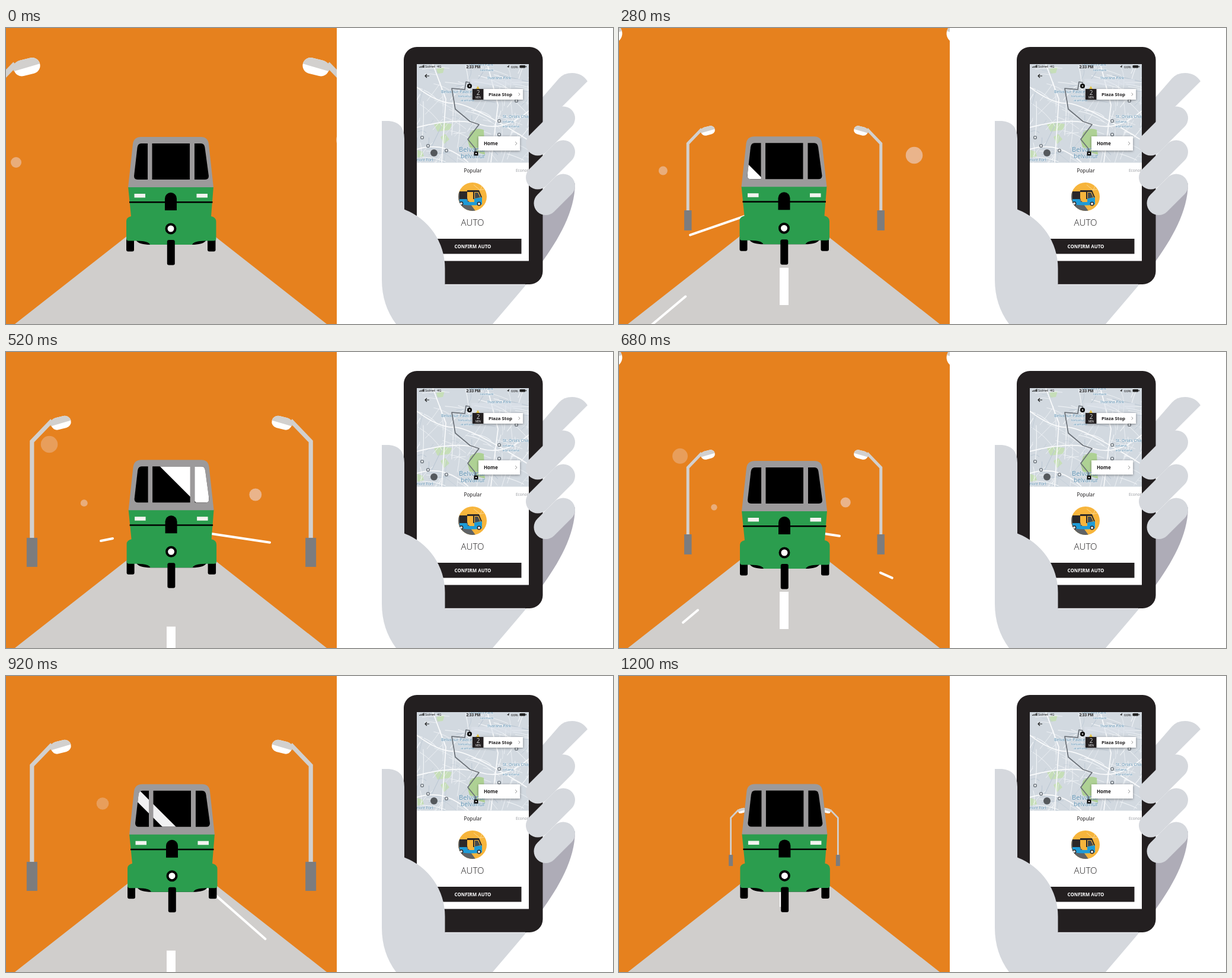
Recreate the animation shown at these times as an HTML page. Size 1024 by 500 pixels, loop 1240 ms.

```html
<!DOCTYPE html>
<html lang="en">
<head>
<meta charset="utf-8">
<title>Auto ride</title>
<style>
html, body { margin: 0; width: 100%; height: 100%; overflow: hidden; background: #fff; }
svg { display: block; width: 1024px; height: 500px; }
text { font-family: "Noto Sans", "Open Sans", sans-serif; fill: #1c1a1b; }
.place { fill: #5d8eae; stroke: #eef3f7; stroke-width: 1; paint-order: stroke; }
.bold { font-weight: 700; }
.mid { text-anchor: middle; }
.card { fill: #fff; filter: drop-shadow(0 1px 2px #0006); }
</style>
</head>
<body>
<svg viewBox="0 0 1024 500" xmlns="http://www.w3.org/2000/svg">
  <defs>
    <clipPath id="stage"><rect width="558" height="500"/></clipPath>
    <clipPath id="mapBox"><rect x="693" y="61" width="189" height="166.500"/></clipPath>
    <clipPath id="screenBox"><rect x="693" y="61" width="189" height="332.500"/></clipPath>
    <clipPath id="badge"><circle cx="787" cy="285" r="24"/></clipPath>
    <path id="glass" d="M216 250L221.500 202Q222.500 195 228 195H329Q334.500 195 335.500 202L342 250Q342 256 336 256H222Q216 256 216 250Z"/>
    <clipPath id="pane"><use href="#glass"/></clipPath>
    <g id="lamp">
      <path d="M-163 40V-99.500L-139.500 -124" fill="none" stroke="#d2d0ce" stroke-width="5"/>
      <rect x="-169.200" y="13.300" width="12.500" height="34" fill="#7c7c7e"/>
      <g transform="translate(-129.100 -121.300) rotate(-14)">
        <rect x="-11.900" y="-7.150" width="23.800" height="14.300" rx="7.150" fill="#fff"/>
        <path d="M-12.500 1L-12 -4Q-9 -7.150 -4.750 -7.150H4.750A7.150 7.150 0 0 1 11.900 0Z" fill="#d2d0ce"/>
      </g>
    </g>
  </defs>

  <g clip-path="url(#stage)">
    <rect width="558" height="500" fill="#e6811e"/>
    <path d="M15 500L215 343H341L541 500Z" fill="#d0cecc"/>
    <g id="dashes" fill="#fff"></g>
    <g id="lamps"></g>
    <g id="bubbles" fill="#ecdfe6"></g>
    <g id="streaks" stroke="#fff" stroke-width="4" stroke-linecap="round"></g>
    <g id="auto">
      <rect x="203" y="352" width="13" height="25.500" rx="3"/>
      <rect x="340" y="352" width="13.500" height="25.500" rx="3"/>
      <path d="M219 358C222 364 232 366 243 366H314C325 366 335 364 338 358Z"/>
      <path d="M206 268H350L346 318Q354.500 320 354.500 327V356Q354.500 359.500 350 359.500H338Q317 359 314 366H243Q240 359 219 359.500H207Q203 359.500 203 355V326Q203 320 211 318Z" fill="#2b9d4e"/>
      <path d="M206 269L214 196Q215.500 184 228 184H329Q340.500 184 342 196L350 269Z" fill="#9c9a9b"/>
      <use href="#glass"/>
      <g clip-path="url(#pane)">
        <path id="shineA" fill="#fff"/>
        <path id="shineB" fill="#f1f1f2"/>
      </g>
      <path d="M239 194H246.500V257H239ZM310 194H318V257H310Z" fill="#9c9a9b"/>
      <path d="M208 293H348.500V295.500H208Z"/>
      <path d="M216.500 280H235V286.500H216.500ZM321.500 280H340V286.500H321.500Z" fill="#f3f3f0"/>
      <path d="M268 308V288A10 10 0 0 1 288 288V308Z"/>
      <circle cx="278" cy="339" r="7.500" fill="#fff" stroke="#000" stroke-width="4"/>
      <rect x="271.800" y="358" width="13" height="42.500" rx="3"/>
    </g>
  </g>

  <path d="M900 290L960 262C960 310 932 357 903 397Z" fill="#aeacb7"/>
  <path d="M900 123L933 85Q941 76 955 76Q972 76 981 90L900 171Z" fill="#d5d8dd"/>
  <rect x="671" y="32" width="234.500" height="401" rx="22" fill="#231f20"/>

  <g clip-path="url(#screenBox)">
    <rect x="693" y="61" width="189" height="333" fill="#fff"/>
    <g clip-path="url(#mapBox)">
      <rect x="693" y="61" width="189" height="167" fill="#d2d9e0"/>
      <g fill="#c6deb8">
        <path d="M722 163L735 160L752 162L749 172L728 175Z"/>
        <path d="M733 184L741 179L748 188L739 196Z"/>
        <path d="M694 206L703 209L705 217L694 219ZM726 69L740 66L737 76L728 77Z"/>
      </g>
      <g id="roads" fill="none"></g>
      <path d="M779 190L783 177Q792 167 806 172L808 214L793 209L782 201Z" fill="#aed194"/>
      <g font-size="6.500">
        <text class="place" x="781" y="64">Tesmani Park</text>
        <text class="place" x="800" y="73" font-size="6">tesmani</text>
        <text class="place" x="812" y="87">Ilvarana Park</text>
        <text class="place" x="734" y="110" font-size="7">Belvanur Palace</text>
        <text class="place" x="763" y="117" font-size="5.500">belvanur</text>
        <text class="place" x="767" y="124" font-size="5.500">aramane</text>
        <text class="place" x="838" y="152" font-size="7">St. Orla's Chapel</text>
        <text class="place" x="838" y="160" font-size="6">orlana</text>
        <text class="place" x="838" y="168" font-size="6">ela orlana</text>
        <text class="place" x="764" y="209" font-size="11">Belvanur</text>
        <text class="place" x="767" y="220" font-size="10">belvanur</text>
        <text class="place" x="691" y="225">inore Fort</text>
      </g>
      <g id="pins" fill="#eef1f3" stroke="#6d757d" stroke-width="1.400"></g>
      <circle cx="722" cy="211" r="6" fill="#55595d"/>
      <rect x="785" y="86" width="85" height="11" fill="#dce3ec" opacity=".6"/>
      <path d="M782 97V92L776 91L774 104L752 102L758 137L783 158L798 163L788 176L779 188L792 204V211" fill="none" stroke="#6a7077" stroke-width="1.700" stroke-linejoin="round"/>
      <circle cx="782" cy="98" r="2.600" fill="#fff" stroke="#111" stroke-width="3"/>
      <rect x="789.500" y="208.500" width="7" height="7" fill="#111"/>
      <rect x="792" y="211" width="2" height="2" fill="#fff"/>
      <path d="M793 103L796 98L799 103Z" fill="#e8c743"/>
    </g>
    <g class="card"><rect x="787" y="103" width="85" height="18"/><rect x="797" y="183" width="70" height="24"/></g>
    <rect x="787" y="103" width="18.500" height="18" fill="#231f20"/>
    <text x="796.500" y="113" class="mid" font-size="10" style="fill:#cfcfcf">2</text>
    <text x="796.500" y="118.500" class="mid" font-size="4.500" style="fill:#fff">MIN</text>
    <text x="814" y="115" class="bold" font-size="7.800">Plaza Stop</text>
    <text x="806" y="198" class="bold" font-size="8">Home</text>
    <path d="M864.500 109.500L867 112L864.500 114.500M859 192L862 195L859 198" fill="none" stroke="#9a9a9a"/>
    <path d="M714 81H707M710 78L707 81L710 84" fill="none" stroke="#222" stroke-width="1.200"/>
    <path d="M697 67V65.500H698.500V67ZM699.500 67V64.500H701V67ZM702 67V63.500H703.500V67ZM704 67V62.500H705.500V67ZM845 66L849 62.500L848 67.500L847 66Z" fill="#222"/>
    <text x="707" y="67" font-size="5.800">Solnet</text>
    <text x="727" y="67" font-size="5.800">4G</text>
    <text x="788.500" y="67.500" class="bold mid" font-size="6.300">2:33 PM</text>
    <text x="852" y="67.500" font-size="6">66%</text>
    <rect x="866.500" y="63" width="9.500" height="4.500" rx="1" fill="#222"/><rect x="876.500" y="64.300" width="1.500" height="2" fill="#222"/>

    <text x="787.500" y="243.500" class="mid" font-size="8.200">Popular</text>
    <text x="860" y="243" font-size="6.500" style="fill:#9b9ea3">Economy</text>
    <g clip-path="url(#badge)">
      <rect x="763" y="261" width="48" height="48" fill="#f7b53c"/>
      <path d="M763 277H772L784 298L792 309H763Z" fill="#5f6366"/>
      <path d="M789 265L800 274L804 265M793 275L808 272" fill="none" stroke="#fbd58d"/>
      <path d="M765 289H777L779 294H790V288L803 286V298Q790 301 766 298Z" fill="#1e9bd7"/>
      <path d="M765 276H778V289H765ZM778 274H798L803 286H801L797 277H790V289H788V277H778Z" fill="#2b2829"/>
      <path d="M791 278H796L800 286L791 288Z" fill="#45494c"/>
      <path d="M779 277.500H788V292H779Z" fill="#f7b53c"/>
      <g fill="#f4f4f4" stroke="#2b2829" stroke-width="1.500"><circle cx="768" cy="296.500" r="2.700"/><circle cx="798" cy="297" r="2.700"/></g>
    </g>
    <text x="787" y="334" class="mid" font-size="15" style="font-family:'Open Sans',sans-serif;font-weight:300">AUTO</text>
    <rect x="693" y="356" width="176.500" height="25.500" fill="#231f20"/>
    <text x="787.500" y="371.500" class="mid" font-size="7.900" font-weight="600" style="fill:#fff">CONFIRM AUTO</text>
  </g>

  <path d="M634 157H646Q672 159 672 187V306.500A106.500 106.500 0 0 1 740.500 406V433H878Q845 472 821 500H658Q634 468 634 425Z" fill="#d5d8dd"/>
  <path d="M741 433.300H876" stroke="#f6f6f8"/>
  <path d="M940 152.500L897 195.500M940 209.500L897 252.500M940 266.500L910.500 296" stroke="#d5d8dd" stroke-width="40" stroke-linecap="round"/>
</svg>

<script>
const NS = "http://www.w3.org/2000/svg";
const $ = id => document.getElementById(id);
function add(parent, tag, attrs = {}) {
  const el = document.createElementNS(NS, tag);
  set(el, attrs);
  return $(parent).appendChild(el);
}
function set(el, attrs) {
  for (const key in attrs) el.setAttribute(key, attrs[key]);
}
const show = (el, on) => el.style.display = on ? "" : "none";

// Street map
let seed = 41;
function rnd() {
  seed = (seed * 1664525 + 1013904223) >>> 0;
  return seed / 4294967296;
}
for (let i = 0; i < 130; i++) {
  const x = 690 + rnd() * 195, y = 58 + rnd() * 172;
  const angle = (rnd() < .5 ? .35 : 1.9) + (rnd() - .5) * .9;
  const len = 12 + rnd() * 50;
  const dx = Math.cos(angle) * len, dy = Math.sin(angle) * len;
  add("roads", "path", {
    d: `M${x} ${y}q${dx * .5 + rnd() * 6} ${dy * .5 - rnd() * 6} ${dx} ${dy}`,
    stroke: i % 5 ? "#f1f4f7" : "#bcc8d4",
    "stroke-width": .5 + rnd() * .7
  });
}
for (const d of ["M693 100Q730 128 755 127T882 190", "M720 61L742 120L735 227",
  "M693 168Q760 150 800 163T882 140", "M812 61L830 130L818 227", "M693 205Q740 190 780 227"])
  add("roads", "path", { d, stroke: "#fafbfc", "stroke-width": 1.7 });
for (const [cx, cy] of [[702, 185], [832, 157], [712, 199], [861, 123], [832, 180], [743, 207]])
  add("pins", "circle", { cx, cy, r: 2.4 });

// Lamp pairs and road marks recede together, one set every 12 steps
const sets = [0, 1, 2].map(i => ({
  start: i * 12,
  dash: add("dashes", "rect", { x: 271, width: 15 }),
  sides: [1, -1].map(dir => ({ dir, el: add("lamps", "use", { href: "#lamp" }) }))
}));

// first step, step of reference, x, y, r, dx, dy, dr, opacity
const bubbles = [
  [0, 0, 17, 227, 9, 7.17, 1.76, -.19, .47],
  [0, 8, 498, 215, 14.3, -9.65, 3.25, -.48, .55],
  [10, 16, 73, 156, 14.3, 7.5, 4.96, -.33, .31]
].map(v => ({ v, el: add("bubbles", "circle", { opacity: v[8] }) }));

// x, y, slope, direction, head start, head speed, tail start, tail speed
const streaks = [
  [0, 391, -.345, 1, 1, 40, 2, 20],
  [45, 510, -.84, 1, 5.2, 24, 8, 24],
  [45, 510, -.84, 1, 16, 22, 17, 21],
  [0, 351, -.2, 1, 8, 22.5, 8, 20],
  [560, 339, .15, -1, 9, 35, 9.7, 18.25],
  [490, 394.6, .445, -1, 16.94, 16, 18.2, 16.2],
  [505, 503.6, .88, -1, 20.2, 28.6, 23.7, 15.7]
].map(v => ({ v, el: add("streaks", "line") }));

// step, x shift, y shift
const sway = [[0, 0, 0], [8, .5, -.8], [16, .6, -1.7], [20, 1, 0], [25, 1.8, -.8], [31, 2.2, -1.8], [36, 1.4, -1.6]];

function swayAt(n) {
  const i = Math.max(1, sway.findIndex(k => k[0] >= n));
  const a = sway[i - 1], b = sway[i];
  const p = (n - a[0]) / (b[0] - a[0]);
  return [1, 2].map(c => a[c] + (b[c] - a[c]) * p);
}

function shine(id, lead, width) {
  const lo = lead - width;
  set($(id), { d: `M${lo + 190} 190H${lead + 190}L${lead + 260} 260H${lo + 260}Z` });
}

function draw(n) {
  for (const s of sets) {
    const p = n - s.start;
    const top = 405 - 14.7 * (p - 8), bottom = 468 - 19.5 * (p - 8);
    show(s.dash, p > 0 && bottom > 340);
    set(s.dash, { y: top, height: Math.max(0, bottom - top) });
    const m = p + 4, scale = (380 - 18.1 * m) / 163;
    for (const { dir, el } of s.sides) {
      show(el, m >= -1 && m < 20);
      set(el, { transform: `translate(279 294.7) scale(${dir * scale} ${scale})` });
    }
  }
  for (const { v, el } of bubbles) {
    const k = n - v[1], r = v[4] + v[7] * k;
    show(el, n >= v[0] && r > 0);
    set(el, { cx: v[2] + v[5] * k, cy: v[3] + v[6] * k, r: Math.max(0, r) });
  }
  for (const { v: [x, y, slope, dir, hn, hv, tn, tv], el } of streaks) {
    const at = (start, speed) => {
      const px = x + dir * speed * Math.max(0, n - start);
      return dir > 0 ? Math.min(px, 240) : Math.max(px, 320);
    };
    const x1 = at(tn, tv), x2 = at(hn, hv);
    show(el, Math.abs(x2 - x1) > .5);
    set(el, { x1, x2, y1: y + slope * (x1 - x), y2: y + slope * (x2 - x) });
  }
  shine("shineA", -13.5 + 19.7 * (n - 8), 80);
  shine("shineB", -27.5 + 18.75 * (n - 25), 23);
  set($("auto"), { transform: `translate(${swayAt(n)})` });
}

// Motion at 30 steps a second, shown at 25 pictures a second
const LOOP = 1240, HOLD = 40;
const begin = performance.now();
function tick(now) {
  const t = Math.max(0, now - begin) % LOOP;
  draw(Math.round(Math.floor(t / HOLD) * 1.2));
  requestAnimationFrame(tick);
}
draw(0);
requestAnimationFrame(tick);
</script>
</body>
</html>
```
